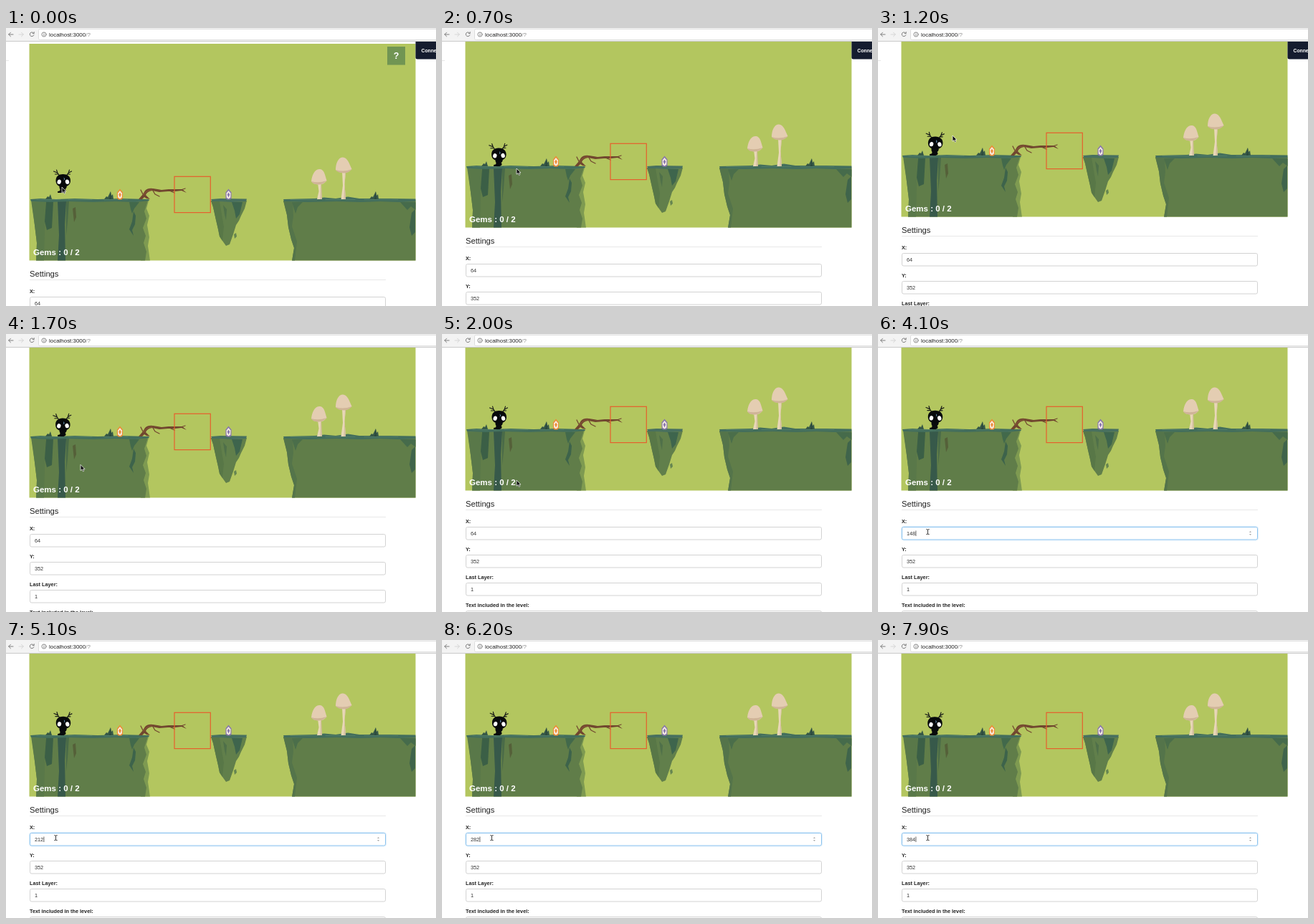
An HTML page that plays this animation: 600 px wide and 388 px high, repeating every 8000 ms.

```html
<!DOCTYPE html>
<html lang="en">
<head>
<meta charset="utf-8">
<title>Level editor</title>
<style>
  html, body { margin: 0; width: 100%; height: 100%; overflow: hidden; background: #fff; }
  svg { display: block; width: 600px; height: 388px; font-family: "Liberation Sans", Arial, sans-serif; }
  .label { font: bold 7.3px "Liberation Sans", Arial, sans-serif; fill: #222; }
  .value { font-size: 7.3px; fill: #333; }
  .line { fill: none; stroke-linecap: round; stroke-linejoin: round; }
</style>
</head>
<body>
<svg viewBox="0 0 600 388">
  <defs>
    <clipPath id="level"><rect x="32.5" y="22" width="539" height="302.5"/></clipPath>
    <g id="spikes" fill="#365847">
      <path d="M0 11 3 7 5 8 9 0 10 6 12 4 13 11z"/>
      <path d="M9 0 7 11 10 11z" fill="#2c493e"/>
    </g>
    <g id="gem">
      <path d="M0-8 4-3 4 5 2 7-2 7-4 5-4-3z" fill="currentColor"/>
      <path d="M0-5.5 2.9-2 2.8 4 0 6-2.8 4-2.9-2z" fill="#f7eee3"/>
      <path d="M0-3 1.8 0 0 4-1.8 0z" fill="currentColor"/>
    </g>
  </defs>

  <g id="page">
    <g clip-path="url(#level)">
      <rect x="32" y="22" width="540" height="303" fill="#b3c65f"/>

      <!-- left cliff -->
      <path d="M192 240 199 241 196 252 200 262 197 275 200 292 198 304 201 325 188 325z" fill="#7e9a51"/>
      <path d="M35 241 198 241 193 256 196 266 191 279 195 290 192 300 196 312 194 325 42 325 43 300 40 275z" fill="#607d49"/>
      <path d="M36 243 55 243 53 325 42 325 43 300 40 275z" fill="#597849"/>
      <path d="M56 242 66 242 64 279 57 282 54 270z" fill="#3b5f46"/>
      <path d="M72 242 84 242 82 274 83 325 72 325 74 289z" fill="#37594a"/>
      <path d="M84 242 88 242 86 270 84 289z" fill="#4a6b48"/>
      <path d="M93 252 97 250 98 264 95 271z" fill="#556039"/>
      <path d="M172 243 186 243 179 252 176 259 174 253z" fill="#42694b"/>
      <path d="M178 256 181 262 180 274 176 282 178 290 172 281 176 270z" fill="#3d634b"/>
      <path d="M34 239 48 238 70 239 96 238 128 239 160 238 199 239 200 241 180 243 152 242 122 243 88 242 61 243 35 242z" fill="#436e5c"/>
      <path class="line" d="M43 239.5H76M87 239.5H120M137 239.5H170" stroke="#55806a" stroke-width=".8"/>

      <!-- floating rock -->
      <path d="M286 241 336 241 333 252 328 262 325 269 321 275 317 288 312 302 307 304 302 297 298 291 296 281 293 268 289 250z" fill="#617f4b"/>
      <path d="M286 241 298 242 301 260 304 277 302 297 298 291 296 281 293 268 289 250z" fill="#587747"/>
      <path d="M315 243 330 243 326 260 321 266 319 255z" fill="#3e654d"/>
      <path d="M303 247 308 253 307 268 305 260z" fill="#4f7049"/>
      <path d="M318 288 321 286 322 291 319 294z" fill="#668550"/>
      <path d="M286 239 299 238 336 238.5 335 242 315 243 300 242 288 242z" fill="#48705f"/>

      <!-- right cliff -->
      <path d="M387 241 572 241 572 325 399 325 402 307 398 295 394 278 392 261z" fill="#607d49"/>
      <path d="M387 241 400 243 401 262 399 277 406 298 403 325 399 325 402 307 398 295 394 278 392 261z" fill="#54744a"/>
      <path d="M399 243 414 243 407 250 404 259z" fill="#4b6e4a"/>
      <path d="M550 243 572 243 572 254 565 249 560 254z" fill="#466b4b"/>
      <path d="M566 258 571 253 571 285 566 290 563 278z" fill="#3f644b"/>
      <path d="M387 239 407 238.5 431 238 444 236.5 460 238 477 235.5 493 238 535 238 572 238.5 572 242 548 243 522 242 494 243 461 242 421 243 388 242z" fill="#436e5c"/>
      <path class="line" d="M397 239.5H435M446 239.5H487M500 239.5H547" stroke="#55806a" stroke-width=".8"/>

      <path d="M55 239 58 235 60 236 62 232 64 239z" fill="#365847"/>
      <use href="#spikes" x="137" y="228"/>
      <use href="#spikes" x="507" y="228"/>

      <!-- branch -->
      <path d="M185 239 191 232 194 227Q198 223 205 224T217 226L227 225 236 225 246 225 252 230 245 227 236 228 226 228 214 229 204 227Q197 228 195 233L201 239 196 238 193 236 190 239z" fill="#71472f"/>
      <g class="line" stroke="#71472f" stroke-width="1.3">
        <path d="M205 227 208 232 214 235M228 227 235 230M191 232 188 226M244 226 250 224"/>
        <path d="M192 233Q196 226 204 225.5" stroke="#925d3a" stroke-width=".8"/>
      </g>

      <use href="#gem" x="159" y="232.5" color="#ed8b35"/>
      <use href="#gem" x="310.5" y="232.5" color="#8876ad"/>

      <!-- mushrooms -->
      <path d="M435 216 440 216 439.5 229 441 239 434 239 436.5 228z" fill="#e8d7b7"/>
      <path d="M439 217 440 217 441 239 438.5 239z" fill="#d3be9f"/>
      <path d="M426 214C427 206 430 197.5 437 197S445 205 447.5 213Q443 219 436 218.5T426 214z" fill="#e4cdb2"/>
      <path d="M426 214Q436 217 447.5 213 442 219 435 218.5 428 218 426 214z" fill="#cfb497"/>
      <path d="M469 200 474 200 472.5 218 474 239 467.5 239 470 220z" fill="#e8d7b7"/>
      <path d="M473 201 474 201 472.5 218 474 239 471.5 239z" fill="#d3be9f"/>
      <path d="M460 198C460 190 463 181 469.5 180.5S479 189 482.5 197Q478 202 471 202T460 198z" fill="#e4cdb2"/>
      <path d="M460 198Q471 201.5 482.5 197 478 202.5 471 202.5 463 202 460 198z" fill="#cfb497"/>

      <!-- creature, feet at the origin -->
      <g id="hero">
        <path d="M-5-11 5-11Q6-7 3-5 6-2 1 0L-7 0Q-9-2-5-2.5-3-4-5-7z" fill="#090b0d"/>
        <g id="head">
          <path class="line" d="M-5-24Q-8-27-9-32M-8-28-13-30M-7-26-11-26M5-24Q8-27 9-32M8-28 12-30M6-26 10-26" stroke="#171917" stroke-width="1.2"/>
          <path d="M-10-17C-10-23-6-26 0-26S10.5-23 10.5-17 6-8.5 0-8.5-10-11-10-17z" fill="#07090b"/>
          <ellipse cx="-5.3" cy="-15.3" rx="2.7" ry="3.2" transform="rotate(12 -5.3 -15.3)" fill="#fff"/>
          <ellipse cx="6" cy="-15.3" rx="2.7" ry="3.2" transform="rotate(-12 6 -15.3)" fill="#fff"/>
          <path d="M1-21.5Q4-19 1-17.2 2.2-19 1-21.5z" fill="#80b8dd"/>
        </g>
      </g>

      <rect x="235" y="207.3" width="50.3" height="50.3" fill="none" stroke="#e65f2d" stroke-width="1.2"/>
      <text x="38" y="316.6" font-size="11.5" font-weight="bold" fill="#fff">Gems : 0 / 2</text>
      <rect x="532" y="26" width="25" height="25.5" fill="#719553"/>
      <text x="544.5" y="43.2" font-size="12.5" font-weight="bold" fill="#fff" text-anchor="middle">?</text>
    </g>

    <text x="33" y="347.2" font-size="11.2" fill="#222">Settings</text>
    <path d="M33 351.5H530" stroke="#e8e8e8"/>
    <g id="form"></g>
  </g>

  <!-- browser bar -->
  <rect width="600" height="19" fill="#f3f3f3"/>
  <rect x="45.5" y="1.5" width="570" height="15" rx="2" fill="#fff" stroke="#ddd"/>
  <path d="M0 18.5H600" stroke="#c9c9c9"/>
  <g class="line" stroke="#707070" stroke-width=".9">
    <path d="M10 9H3.7M6.5 6.2 3.7 9 6.5 11.8"/>
    <path d="M18 9H24.3M21.5 6.2 24.3 9 21.5 11.8" stroke="#d2d2d2"/>
    <path d="M38.6 7.2A2.9 2.9 0 1 0 38.9 9.8M39.2 5.6V7.6H37.2"/>
    <circle cx="53" cy="9" r="3.1" stroke-width=".8"/>
    <path d="M53 8.7V10.5M53 7.2h.1"/>
  </g>
  <text x="60" y="11.8" font-size="7.95" fill="#222">localhost:3000<tspan fill="#888">/?</tspan></text>

  <g id="navbar">
    <path d="M0 45.5H4" stroke="#e8e8e8"/>
    <path d="M571.5 19H600V43.5H574Q571.5 43.5 571.5 41z" fill="#151c2f"/>
    <text x="579.5" y="33.6" font-size="6.8" font-weight="bold" fill="#fff">Connect</text>
  </g>

  <path id="arrow" d="M0 0V8.2L2 6.5 3.4 9.4 4.8 8.7 3.5 6H6z" fill="#111" stroke="#fff" stroke-width=".7"/>
  <g id="beam" class="line">
    <path d="M-1.7-3.5Q0-3.5 0-2.5 0-3.5 1.7-3.5M0-2.5V2.7M-1.7 3.7Q0 3.7 0 2.7 0 3.7 1.7 3.7" stroke="#222" stroke-width=".9"/>
  </g>
</svg>

<script>
const LOOP = 8000, STEP = 100;
const $ = id => document.getElementById(id);

// Tables of [time, value]
const scrollSteps = [[100, 0], [300, 17], [500, 38], [700, 46], [1000, 50], [1200, 61], [1500, 86], [1900, 106]];
const countSteps = [[2750, 64], [4100, 148], [6200, 282], [7900, 384]];
const mouseX = [[0, 78], [500, 104], [2000, 104], [2500, 69.5]];
const mouseY = [[0, 222], [500, 196], [700, 196], [1200, 150], [1400, 150], [1900, 204], [2000, 204], [2500, 276]];
const heroY = [[0, 230], [200, 239]];
const focusAt = 2500, navbarHidesAt = 1500;

function sample(steps, t) {
  if (t <= steps[0][0]) return steps[0][1];
  for (let i = 1; i < steps.length; i++) {
    const [t0, a] = steps[i - 1], [t1, b] = steps[i];
    if (t <= t1) return a + (b - a) * (t - t0) / (t1 - t0);
  }
  return steps.at(-1)[1];
}

const fields = [["X:", "64"], ["Y:", "352"], ["Last Layer:", "1"], ["Text included in the level:", ""]];
$("form").innerHTML = fields.map(([label, value], i) => {
  const y = 367 + i * 39;
  return `<text class="label" x="33" y="${y + 2.6}">${label}</text>
    <rect class="box" x="33.5" y="${y + 8.5}" width="496" height="17.5" rx="2.2" fill="#fff" stroke="#d2d2d2"/>
    <text class="value" x="40" y="${y + 19.8}">${value}</text>`;
}).join("") + `<g id="focus">
    <rect x="32.5" y="374.5" width="498" height="19.5" rx="3" fill="none" stroke="#66afe9" stroke-opacity=".18"/>
    <path id="caret" d="M0 380.5V388" stroke="#222" stroke-width=".7"/>
    <path d="M518 383 519.5 381 521 383zM518 385 519.5 387 521 385z" fill="#aaa"/>
  </g>`;
const box = document.querySelector(".box");
const number = document.querySelector(".value");

const place = (el, x, y, extra = "") => el.setAttribute("transform", `translate(${x} ${y}) ${extra}`);
const show = (el, on) => el.setAttribute("visibility", on ? "visible" : "hidden");

function draw(t) {
  const focused = t >= focusAt;
  place($("page"), 0, -Math.round(sample(scrollSteps, t)));
  show($("navbar"), t < navbarHidesAt);

  const sway = Math.sin(t / 1000 * Math.PI * 2);
  place($("hero"), 79.5, sample(heroY, t));
  place($("head"), 0, -0.5 * sway, `rotate(${sway * 1.5})`);

  const count = String(Math.round(sample(countSteps, t)));
  number.textContent = count;
  box.setAttribute("stroke", focused ? "#8ac2ef" : "#d2d2d2");
  show($("focus"), focused);
  place($("caret"), 40.7 + count.length * 4.06, 0);

  const x = sample(mouseX, t), y = sample(mouseY, t);
  const overField = t > 2000 && y > 269;
  place($("arrow"), x, y);
  place($("beam"), x, y);
  show($("arrow"), !overField);
  show($("beam"), overField);
}

const start = performance.now();
function tick(now) {
  const t = Math.max(0, now - start) % LOOP;
  draw(Math.floor(t / STEP) * STEP);
  requestAnimationFrame(tick);
}
draw(0);
requestAnimationFrame(tick);
</script>
</body>
</html>
```
